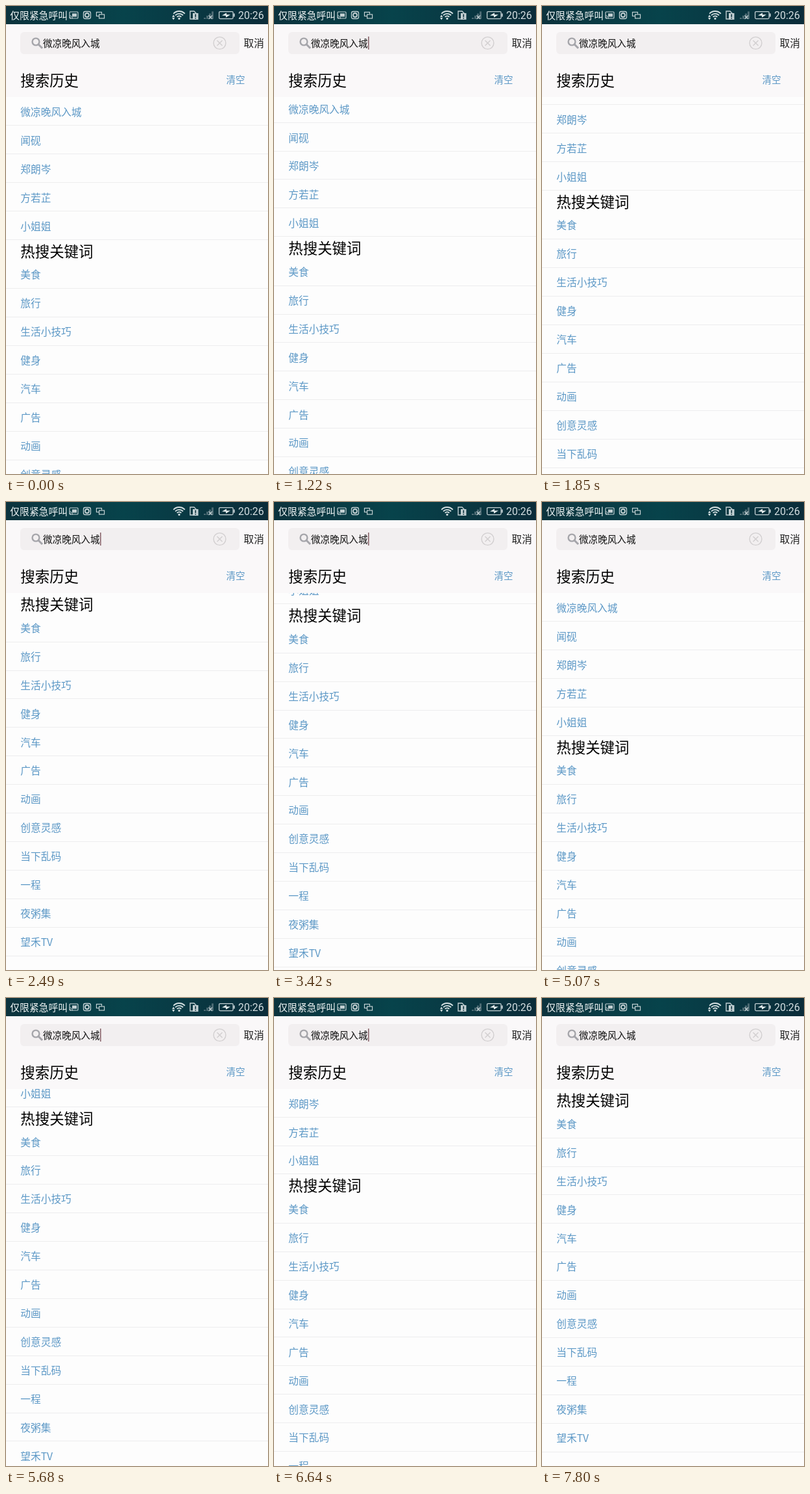
Write an HTML page with a canvas that moves like this. It is 404 px wide and 720 px high and loops after 8 s.

```html
<!DOCTYPE html>
<html lang="zh-CN">
<head>
<meta charset="utf-8">
<title>搜索</title>
<style>
html, body { margin: 0; width: 100%; height: 100%; overflow: hidden; background: #fdfdfd; }
canvas { display: block; width: 404px; height: 720px; }
</style>
</head>
<body>
<canvas id="stage" width="404" height="720"></canvas>
<script>
const W = 404, H = 720, LOOP = 8000;
const STEP = 78.25, PHASE = 200;   // the screen refreshes in even steps
const PITCH = 43.92, LIST_TOP = 140, END = 219.4;
const BLUE = '#5c98c6';
const CJK = '"Noto Sans CJK SC", "Noto Sans CJK", sans-serif';

const query = '微凉晚风入城';
const history = [query, '闻砚', '郑朗岑', '方若芷', '小姐姐'];
const hot = ['美食', '旅行', '生活小技巧', '健身', '汽车', '广告', '动画',
  '创意灵感', '当下乱码', '一程', '夜粥集', '望禾TV'];

// step, scroll offset, speed per step
const keys = [
  [11, 0, 0], [21, 75.8, 11], [29, END, 0],
  [37, END, 0], [48, 125.6, -12], [55, 0, 0],
  [63, 0, 0], [72, END, 0],
  [75, END, 0], [82, 88.2, -20], [86, 0, 0],
  [89, 0, 0], [97, END, 0]
];

const ctx = document.getElementById('stage').getContext('2d');

function scrollAt(t) {
  const k = Math.floor((t - PHASE) / STEP);
  if (k <= keys[0][0]) return 0;
  const i = keys.findIndex(key => key[0] >= k);
  if (i < 0) return END;
  const [k0, a, va] = keys[i - 1], [k1, b, vb] = keys[i];
  const d = k1 - k0, u = (k - k0) / d, u2 = u * u, u3 = u2 * u;
  return (2 * u3 - 3 * u2 + 1) * a + (u3 - 2 * u2 + u) * d * va
    + (3 * u2 - 2 * u3) * b + (u3 - u2) * d * vb;
}

function text(str, x, mid, size, color, family = CJK) {
  ctx.font = `${size}px ${family}`;
  ctx.fillStyle = color;
  ctx.fillText(str, x, mid + size * 0.38);
}

function rect(x, y, w, h, color) {
  ctx.fillStyle = color;
  ctx.fillRect(x, y, w, h);
}

function round(x, y, w, h, r) {
  ctx.beginPath();
  ctx.roundRect(x, y, w, h, r);
}

function stroke(color, width) {
  ctx.strokeStyle = color;
  ctx.lineWidth = width;
  ctx.stroke();
}

function path(...pts) {
  ctx.beginPath();
  for (let i = 0; i < pts.length; i += 2) ctx.lineTo(pts[i], pts[i + 1]);
}

function line(color, width, ...pts) {
  path(...pts);
  stroke(color, width);
}

function arc(x, y, r, from = 0, to = Math.PI * 2) {
  ctx.beginPath();
  ctx.arc(x, y, r, from, to);
}

function rows(items, mid, rule) {
  items.forEach((item, i) => {
    const y = i * PITCH;
    text(item, 22.3, mid + y, 15.71, BLUE);
    rect(0, Math.round(rule + y), W, 1, '#ededee');
  });
}

function drawList(scroll) {
  ctx.save();
  ctx.beginPath();
  ctx.rect(0, LIST_TOP, W, H - LIST_TOP);
  ctx.clip();
  rows(history, 163 - scroll, 183 - scroll);
  text('热搜关键词', 22.3, 377 - scroll, 22.44, '#000');
  rows(hot, 413.3 - scroll, 434 - scroll);
  ctx.restore();
}

function drawHeader(cursor) {
  rect(0, 28, W, LIST_TOP - 28, '#faf8f9');
  round(22, 40, 338, 34, 6);
  ctx.fillStyle = '#f2eff0';
  ctx.fill();

  arc(46, 55, 5.4);
  stroke('#a5a5aa', 2.4);
  line('#a5a5aa', 3, 50, 59, 56, 65);
  text(query, 57, 57, 14.59, '#111');
  if (cursor) rect(145, 47, 1.6, 20, '#8a656c');

  arc(329.5, 57, 9.4);
  stroke('#d2cfd0', 1.4);
  line('#d2cfd0', 1.4, 325.5, 53, 333.5, 61);
  line('#d2cfd0', 1.4, 333.5, 53, 325.5, 61);

  text('取消', 366.5, 57, 15.71, '#222');
  text('搜索历史', 22.3, 114, 22.44, '#000');
  text('清空', 339.5, 113, 14.59, BLUE);
}

function drawWifi(active) {
  const x = 267, y = 20, c = '#d3dee0';
  for (const r of [4.5, 8.2, 12]) {
    arc(x, y, r, -Math.PI * 0.76, -Math.PI * 0.24);
    stroke(c, 1.8);
  }
  arc(x, y - 0.6, 1.6);
  ctx.fillStyle = c;
  ctx.fill();
  if (!active) return;
  path(256, 17, 258.2, 13.5, 260.4, 17);
  ctx.fill();
  path(256, 18, 258.2, 21.5, 260.4, 18);
  ctx.fill();
}

function drawStatus(active) {
  const bg = ctx.createLinearGradient(0, 0, W, 0);
  bg.addColorStop(0, '#0c333d');
  bg.addColorStop(0.45, '#07434b');
  bg.addColorStop(1, '#0b2c39');
  rect(0, 0, W, 28, bg);

  const c = '#c3d0d3';
  text('仅限紧急呼叫', 6.3, 14, 14.8, '#f2f6f6');

  // cast
  round(98, 9, 13, 10, 1);
  stroke(c, 1.2);
  rect(102, 11.5, 7, 5, c);
  for (const r of [2, 4.5]) {
    arc(98, 19.5, r, -Math.PI / 2, 0);
    stroke(c, 1.1);
  }
  // capture
  round(119.5, 8.5, 11, 11, 2.5);
  stroke(c, 1.3);
  arc(125, 14, 3);
  stroke(c, 1.8);
  // windows
  ctx.strokeStyle = c;
  ctx.lineWidth = 1.2;
  ctx.strokeRect(139.5, 9.5, 8, 6);
  rect(143, 12.5, 9.5, 7, '#093e47');
  ctx.strokeRect(143.6, 13, 8, 6);

  drawWifi(active);

  // card with alert
  path(284, 8, 290, 8, 293, 11, 293, 20, 284, 20);
  ctx.closePath();
  stroke(c, 1.4);
  rect(288, 11, 8.5, 10, c);
  rect(291.5, 12.5, 1.6, 4.5, '#0b303c');
  rect(291.5, 18, 1.6, 1.6, '#0b303c');

  // weak signal
  for (let i = 0; i < 4; i++) {
    const h = 2 + i * 3.2;
    rect(305 + i * 4, 20 - h, 3, h, '#4c6a73');
  }
  line(c, 1.3, 312.5, 14.5, 318, 20);
  line(c, 1.3, 318, 14.5, 312.5, 20);

  // battery
  round(328.6, 8.6, 21.5, 11, 1.5);
  stroke(c, 1.3);
  rect(350.7, 11.5, 2, 5, c);
  path(333, 14.5, 340, 10.5, 340, 13.2, 346, 13.2, 339, 17.8, 339, 14.9);
  ctx.fillStyle = '#e4ecec';
  ctx.fill();

  text('20:26', 358, 14.2, 16, '#d3dde0', 'Roboto, sans-serif');
}

function frame() {
  const t = performance.now() % LOOP;
  const blink = t % 1000;
  rect(0, 0, W, H, '#fdfdfd');
  drawList(scrollAt(t));
  drawHeader(blink >= 210 && blink < 720);
  drawStatus(t < 2020 || t > 4200);
  requestAnimationFrame(frame);
}
frame();
</script>
</body>
</html>
```
